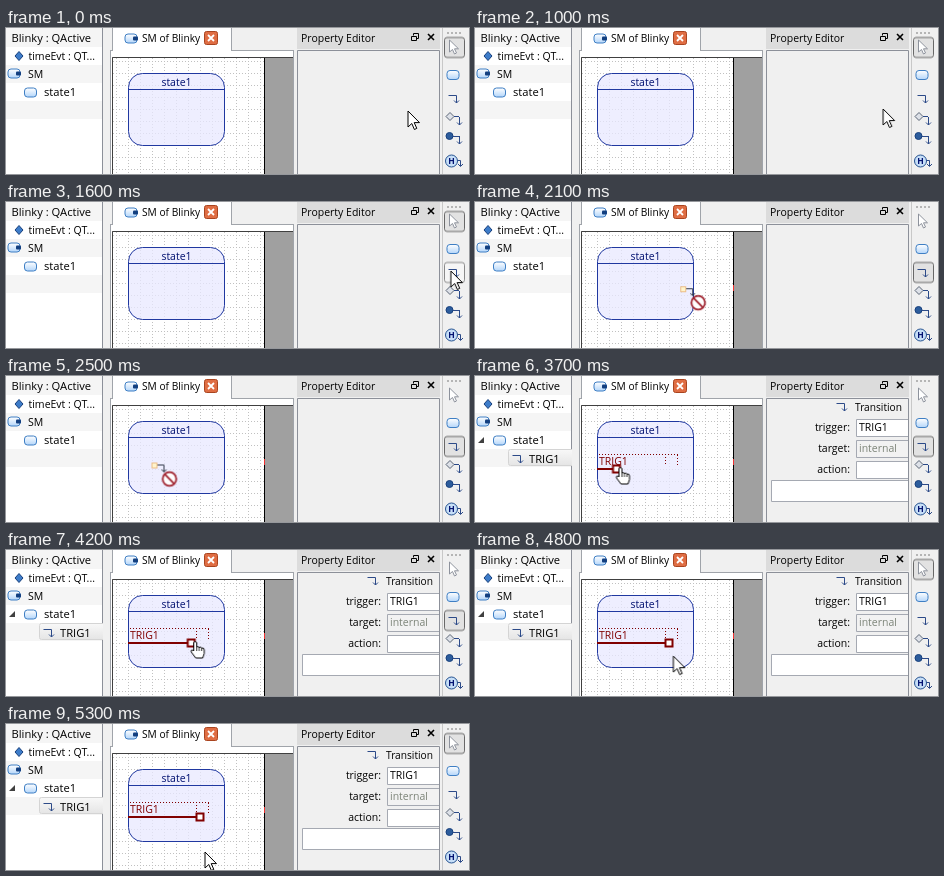
An HTML page that plays this animation: 463 by 146 pixels, repeating every 7.3 s.

```html
<!DOCTYPE html>
<html lang="en">
<head>
<meta charset="utf-8">
<title>Drawing an internal transition</title>
<style>
html, body { margin: 0; width: 100%; height: 100%; overflow: hidden; background: #f0f0f0; }
svg { display: block; width: 463px; height: 146px; }
text { font: 10.5px "Open Sans", "Noto Sans", sans-serif; fill: #000; }
.tree { font-size: 11.2px; }
.end { text-anchor: end; }
.navy { fill: #001070; }
.red { fill: #800000; }

/* every move runs in eight jumps, 100 ms apart */
.mouse, .handle, .wire { animation: 7.3s steps(8, start) infinite; }
.mouse { animation-name: mouse; }
.handle { animation-name: handle; }
.wire { animation-name: wire; transform-origin: 122px 0; }
@keyframes mouse {
  0%, 13.6986% { transform: translate(402px, 83px); }
  24.6574% { transform: translate(451px, 67px); }
  24.6575% { transform: translate(268px, 85px); }
  35.6164% { transform: translate(148.5px, 89.5px); }
  46.5753%, 49.3149% { transform: translate(124px, 94px); }
  49.315% { transform: translate(128px, 93px); }
  60.2739%, 63.0136% { transform: translate(198px, 93px); }
  73.9726%, 100% { transform: translate(199px, 128px); }
}
@keyframes handle {
  0%, 49.315% { transform: translate(124px, 93px); }
  60.2739%, 100% { transform: translate(194px, 93px); }
}
@keyframes wire {
  0%, 49.315% { transform: scaleX(.03); }
  60.2739%, 100% { transform: scaleX(1); }
}

/* what is visible when */
.arrow, .drag, .no, .anchor, .hand, .pick, .hover, .tool, .made, .trace {
  animation: 7.3s step-end infinite;
}
.arrow { animation-name: arrow; }
.drag { animation-name: drag; }
.no { animation-name: no; }
.anchor { animation-name: anchor; }
.hand { animation-name: hand; }
.pick { animation-name: pick; }
.hover { animation-name: hover; }
.tool { animation-name: tool; }
.made { animation-name: made; }
.trace { animation-name: trace; }
@keyframes arrow { 0%, 64.3835% { opacity: 1; } 24.6575% { opacity: 0; } 100% { opacity: 1; } }
@keyframes drag { 0%, 49.315%, 100% { opacity: 0; } 24.6575% { opacity: 1; } }
@keyframes no { 0%, 43.8356%, 100% { opacity: 0; } 24.6575% { opacity: 1; } }
@keyframes anchor { 0%, 49.315%, 100% { opacity: 0; } 43.8356% { opacity: 1; } }
@keyframes hand { 0%, 64.3835%, 100% { opacity: 0; } 49.315% { opacity: 1; } }
@keyframes pick { 0%, 63.0136%, 100% { opacity: 1; } 24.6575% { opacity: 0; } }
@keyframes hover { 0%, 24.6575%, 100% { opacity: 0; } 20.5479% { opacity: 1; } }
@keyframes tool { 0%, 63.0136%, 100% { opacity: 0; } 24.6575% { opacity: 1; } }
@keyframes made { 0% { opacity: 0; } 49.315%, 100% { opacity: 1; } }
@keyframes trace { 0% { opacity: 0; } 24.6575%, 100% { opacity: 1; } }
</style>
</head>
<body>
<svg viewBox="0 0 463 146">
  <defs>
    <pattern id="grid" x="122" y="45" width="12" height="12" patternUnits="userSpaceOnUse">
      <path d="M0 .5H12M.5 0V12" stroke="#c0c0c0" stroke-dasharray="1 2" fill="none"/>
    </pattern>
    <linearGradient id="blue" x2="0" y2="1">
      <stop stop-color="#fff"/><stop offset="1" stop-color="#b4d6fa"/>
    </linearGradient>
    <linearGradient id="row" x2="0" y2="1">
      <stop stop-color="#f8f8f8"/><stop offset="1" stop-color="#e5e5e5"/>
    </linearGradient>
    <rect id="state" x="-6" y="-4.5" width="12" height="9" rx="3" fill="url(#blue)" stroke="#3f7fc4"/>
    <g id="machine">
      <rect x="-6" y="-4.5" width="12" height="9" rx="3" fill="url(#blue)" stroke="#3f7fc4"/>
      <rect x="2" y="-2" width="5" height="4" rx="1" fill="#123f80"/>
    </g>
    <g id="trans" fill="none" stroke="#2c4a88">
      <path d="M-5.5-3.5H2.5V4"/><path d="M0 1.5 2.5 4 5 1.5"/>
    </g>
    <path id="down" d="M.5-4V4M-2 1.5 .5 4 3 1.5" fill="none" stroke="#2c4a88"/>
    <path id="pointer" d="M0 0V16L3.8 12.5 6.4 18.5 8.8 17.4 6.2 11.6H11.5Z" fill="#fff" stroke="#000"/>
    <rect id="button" x="438.5" width="20" height="20" rx="2.5"/>
  </defs>

  <rect width="463" height="146" fill="#f0f0f0"/>

  <!-- model tree -->
  <rect width="96" height="146" fill="#fff"/>
  <path d="M0 0H96V19H0ZM0 37H96V55H0ZM0 73H96V91H0Z" fill="#f5f5f5"/>
  <path d="M96.5 0V146" stroke="#8c9099"/>
  <text class="tree" x="5.5" y="14">Blinky : QActive</text>
  <path d="M13 23.5 17 28 13 32.5 9 28Z" fill="#3d7cc9" stroke="#173f7c"/>
  <text x="22.5" y="32">timeEvt : QT...</text>
  <use href="#machine" x="8" y="45.5"/>
  <text x="22" y="49.5">SM</text>
  <use href="#state" x="24.5" y="64.5"/>
  <text class="tree" x="38" y="68">state1</text>
  <g class="made">
    <path d="M9 61V67H3Z" fill="#404040"/>
    <path d="M97 73.5H35.5Q33.5 73.5 33.5 75.5V87.5Q33.5 89.5 35.5 89.5H97" fill="url(#row)" stroke="#d4d4d4"/>
    <use href="#trans" x="43" y="83"/>
    <text class="tree" x="54" y="87">TRIG1</text>
  </g>

  <!-- diagram window -->
  <rect x="104.5" y="22.5" width="183" height="130" fill="#fff" stroke="#a0a4aa"/>
  <path d="M106.5 23V-.5H225.5V23" fill="#fff" stroke="#a0a4aa"/>
  <use href="#machine" x="125" y="10.5"/>
  <text x="136" y="14" style="font-size:10.2px">SM of Blinky</text>
  <rect x="198.5" y="3.5" width="13" height="13" rx="2" fill="#df6d43" stroke="#a9441f"/>
  <path d="M202 7 208 13M208 7 202 13" stroke="#fff" stroke-width="1.8"/>
  <rect x="106" y="29" width="181" height="117" fill="#a0a0a0"/>
  <rect x="107" y="30" width="151" height="116" fill="#fff"/>
  <rect x="107" y="30" width="151" height="116" fill="url(#grid)"/>
  <path d="M106.5 146V29.5H287" fill="none" stroke="#404040"/>
  <path d="M258.5 30V146" stroke="#000"/>
  <path class="trace" d="M258.5 83V89" stroke="#f03030"/>

  <rect x="122.5" y="45.5" width="96" height="72" rx="14" fill="#e8e8ff" fill-opacity=".75" stroke="#2038a0"/>
  <path d="M122.5 61.5H218.5" stroke="#2038a0"/>
  <text class="navy" x="170.5" y="57.5" text-anchor="middle">state1</text>

  <g class="made">
    <path d="M124 78.5H203M202.5 79V89M190.5 81V88" stroke="#800000" stroke-dasharray="1 2" fill="none"/>
    <text class="red" x="124" y="89">TRIG1</text>
    <rect class="wire" x="122" y="92" width="72" height="2" fill="#800000"/>
    <g class="handle">
      <rect x="-3.5" y="-3.5" width="7" height="7" fill="#fff" stroke="#800000" stroke-width="2"/>
    </g>
  </g>

  <!-- property editor -->
  <rect x="291" width="143" height="21" fill="#dcdcdc"/>
  <text x="295" y="14">Property Editor</text>
  <path d="M407.5 7.5V5.5H412.5V10.5H410.5M405.5 8.5H410.5V12.5H405.5Z" fill="none" stroke="#000"/>
  <path d="M422 6 428 12M428 6 422 12" stroke="#000" stroke-width="1.6"/>
  <path d="M291.5 146V22.5H433.5V146" fill="none" stroke="#8c9099"/>
  <g class="made">
    <use href="#trans" x="367" y="31"/>
    <text x="380" y="35" style="font-size:10.2px">Transition</text>
    <g fill="#fff" stroke="#a5a9b2">
      <path d="M433 43.5H381.5V60.5H433"/>
      <path d="M433 64.5H381.5V81.5H433" fill="#f2f2f2"/>
      <path d="M433 85.5H381.5V102.5H433"/>
      <path d="M433 104.5H296.5V125.5H433"/>
    </g>
    <text class="end" x="375" y="55">trigger:</text>
    <text class="end" x="375" y="76">target:</text>
    <text class="end" x="375" y="97">action:</text>
    <text x="384" y="55">TRIG1</text>
    <text x="384" y="76" style="fill:#7c8478">internal</text>
  </g>

  <!-- tool bar -->
  <path d="M436.5 0V146" stroke="#c8c8c8"/>
  <path d="M441 5H457" stroke="#b5b5b5" stroke-width="2" stroke-dasharray="2 2"/>
  <g fill="#e2e2e2" stroke="#686868">
    <use class="pick" href="#button" y="9.5"/>
    <use class="hover" href="#button" y="60.5" fill="#f6f6f6" stroke="#8a8a8a"/>
    <use class="tool" href="#button" y="60.5"/>
  </g>
  <path d="M443.5 12V24L446.5 21.5 448.5 26 450.5 25 448.5 20.8H452.5Z" fill="#fff" stroke="#8d929c"/>
  <use href="#state" x="447" y="47"/>
  <use href="#trans" x="448" y="71"/>
  <path d="M444 84.5 448 88.5 444 92.5 440 88.5Z" fill="#dde1e8" stroke="#5a6474"/>
  <path d="M448 88.5H453" stroke="#2c4a88"/>
  <use href="#down" x="453" y="93"/>
  <circle cx="443.5" cy="108" r="3.5" fill="#2c5c9c" stroke="#173f7c"/>
  <path d="M447 108.5H453" stroke="#2c4a88"/>
  <use href="#down" x="453" y="112"/>
  <circle cx="445.5" cy="133" r="6" fill="#c6def7" stroke="#24518f"/>
  <text class="navy" x="445.5" y="136" text-anchor="middle" style="font-size:8.5px;font-weight:bold">H</text>
  <path d="M451.5 132.5H454.5V138M452 136 454.5 138.5 457 136" fill="none" stroke="#2c4a88"/>

  <!-- mouse -->
  <g class="mouse">
    <use class="arrow" href="#pointer"/>
    <g class="drag">
      <rect x="-2.5" y="-2.5" width="5" height="5" fill="#fff4cc" stroke="#e08a28" stroke-dasharray="1 1"/>
      <path d="M3-.5H9.5V6M7 4 9.5 6.5 12 4" fill="none" stroke="#303848"/>
    </g>
    <g class="no" fill="#fff" stroke="#a02430" stroke-width="1.8">
      <circle cx="15" cy="13.5" r="6.8"/><path d="M10.2 8.7 19.8 18.3"/>
    </g>
    <g class="anchor" fill="none" stroke="#173f6c" stroke-width="1.7">
      <circle cx="14" cy="8.5" r="1.8"/>
      <path d="M14 10.5V20M10.5 12.5H17.5M8 15.5Q9 20 14 20 19 20 20 15.5M7 17.5 8 15 10.5 16.5M17.5 16.5 20 15 21 17.5"/>
    </g>
    <g class="hand">
      <path d="M-1.5 8V-.5Q0-2.5 1.5-.5V4Q3 3 4 4.5 5.5 3.5 6.5 5 9 4.5 9 7V10.5L7.5 15H.5L-4 9Q-4.5 6.5-2.5 7Z" fill="#fff" stroke="#000"/>
      <path d="M1.5 4V8M4 4.5V8M6.5 5V8" stroke="#000" stroke-width=".8"/>
    </g>
  </g>
</svg>
</body>
</html>
```
